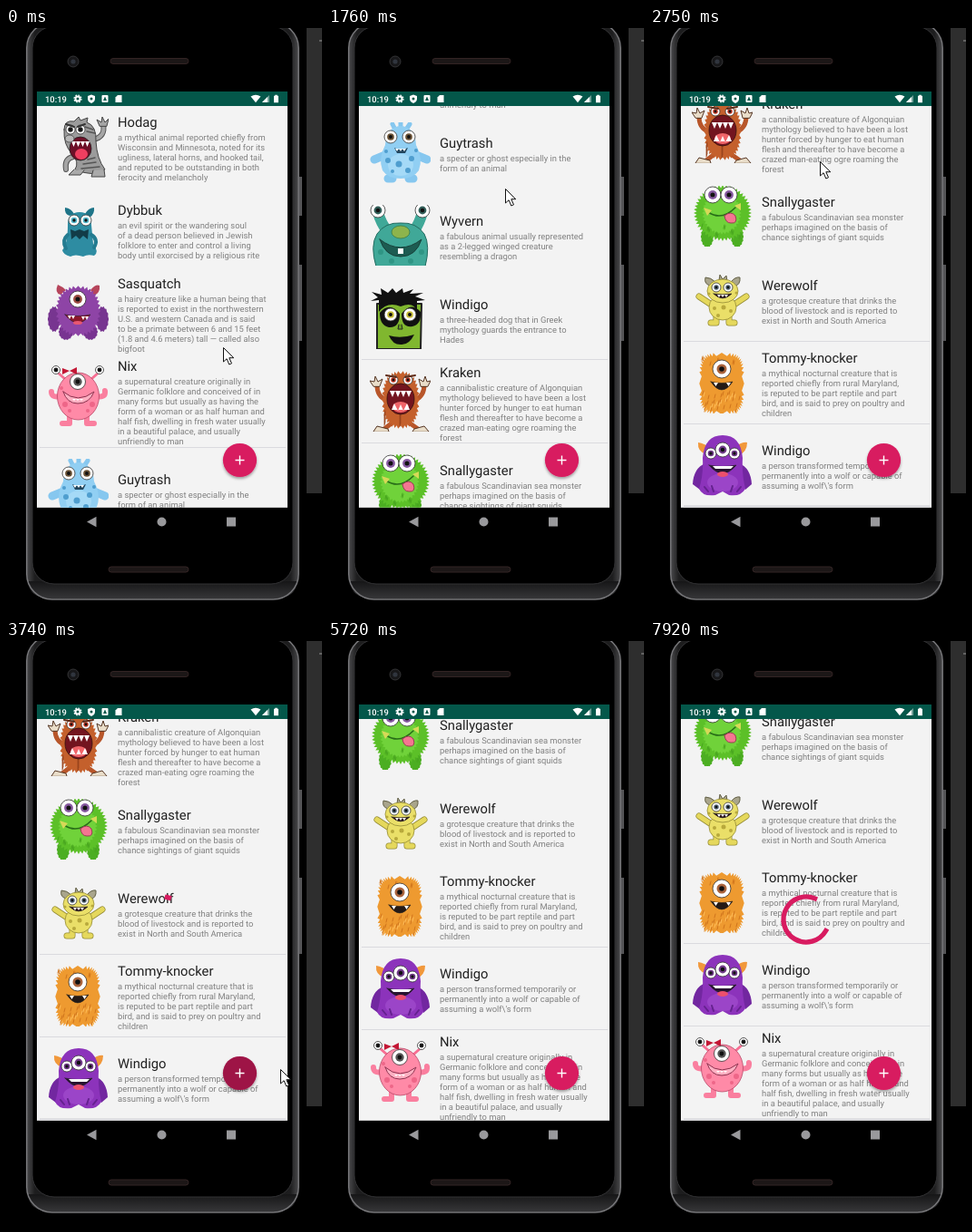
Recreate the animation shown at these times as an HTML page. Size 348 px wide and 645 px high, loop 8 s.

```html
<!DOCTYPE html>
<html lang="en">
<head>
<meta charset="utf-8">
<title>Monster list</title>
<style>
html, body { margin: 0; width: 100%; height: 100%; overflow: hidden; background: #000; }
svg { display: block; width: 348px; height: 645px; }
text { font-family: Roboto, sans-serif; text-rendering: geometricPrecision; }
.title { font-size: 14.77px; fill: #202020; }
.body { font-size: 9.4px; fill: #808080; }
.time { font-size: 9.4px; font-weight: 500; fill: #fff; }
</style>
</head>
<body>
<svg viewBox="0 0 348 645">
  <defs>
    <clipPath id="listClip"><rect x="34" y="86" width="276" height="442.8"/></clipPath>
    <clipPath id="box"><rect width="67" height="67"/></clipPath>
    <filter id="shade" x="-40%" y="-40%" width="180%" height="190%">
      <feDropShadow dx="0" dy="2" stdDeviation="1.6" flood-opacity=".35"/>
    </filter>
    <linearGradient id="rim">
      <stop stop-color="#4a4a4c"/><stop offset=".03" stop-color="#1d1d1e"/>
      <stop offset=".97" stop-color="#1d1d1e"/><stop offset="1" stop-color="#4a4a4c"/>
    </linearGradient>
    <linearGradient id="chin" x2="0" y2="1">
      <stop stop-color="#161617"/><stop offset="1" stop-color="#363638"/>
    </linearGradient>
  </defs>

  <rect width="348" height="645"/>
  <rect x="331" width="17" height="513" fill="#2e2e2e"/>
  <path d="M345 14h3" stroke="#999"/>
  <path d="M324.5 164v43M324.5 261v84" stroke="#555557" stroke-width="3"/>
  <rect x="22.8" y="-6" width="299.4" height="636" rx="28" fill="url(#rim)"/>
  <path d="M24 610H321Q319 629 296 629H49Q26 629 24 610z" fill="url(#chin)"/>
  <rect x="22.8" y="-6" width="299.4" height="636" rx="28" fill="none" stroke="#77777a" stroke-width="1.5"/>
  <rect x="29" y="-2" width="287" height="615" rx="24" stroke="#343436"/>
  <g fill="#1c1717" stroke="#332424">
    <rect x="115" y="33.5" width="86" height="6" rx="3"/>
    <rect x="113" y="594" width="88" height="6" rx="3"/>
  </g>
  <circle cx="74" cy="37" r="6" fill="#171719" stroke="#343436"/>
  <circle cx="74" cy="37" r="2.6" fill="#30353e"/>

  <rect x="34" y="70" width="276" height="458.8" fill="#f3f3f3"/>
  <g clip-path="url(#listClip)"><g id="list"></g><g id="lines"></g></g>
  <circle id="spin" cx="172" cy="307" r="25" fill="none" stroke="#d81b60" stroke-width="5.3"
    stroke-linecap="square" pathLength="360"/>
  <g filter="url(#shade)"><circle cx="257.5" cy="476.5" r="18.6" fill="#d81b60"/></g>
  <circle id="press" cx="257.5" cy="476.5" r="18.6"/>
  <path d="M252.5 476.5h10M257.5 471.5v10" stroke="#fff" stroke-width="1.4"/>

  <rect x="34" y="70" width="276" height="16" fill="#04574a"/>
  <text class="time" x="43" y="81.5">10:19</text>
  <g fill="#fff">
    <circle cx="79" cy="78" r="2.5" fill="none" stroke="#fff" stroke-width="2"/>
    <circle cx="79" cy="78" r="4" fill="none" stroke="#fff" stroke-width="1.2" stroke-dasharray="1.7 1.44"/>
    <path d="M94 73.4l4 1.6v3q0 3.4-4 5q-4-1.6-4-5v-3z"/>
    <circle cx="94" cy="78" r="1.5" fill="#04574a"/>
    <rect x="105.5" y="74" width="7" height="8" rx="1"/>
    <path d="M109 75.5l-2 4.5h4z" fill="#04574a"/>
    <path d="M123 74h4.5v8h-7v-5.5z"/>
    <path d="M269.5 75.5q5.5-3.6 11 0l-5.5 6.700z"/>
    <path d="M290 74v8h-8z" opacity=".45"/><path d="M288 76v6h-6z"/>
    <path d="M295 74.8h1.3v-1h2.4v1h1.3v7.4h-5z"/>
  </g>
  <g fill="#99999c">
    <path d="M89 544.5l10.5-5.8v11.6z"/>
    <circle cx="171.5" cy="544.5" r="5"/>
    <rect x="243" y="539.5" width="10" height="10"/>
  </g>
  <path id="cursor" d="M.5.5v15.500l3.600-3.300 2.700 6.300 2.700-1.200-2.700-6.100h5z" fill="#fff" stroke="#111"/>
</svg>

<script>
const $ = id => document.getElementById(id);

// Drawing helpers; each returns SVG markup in a 67 x 67 box.
const path = (d, fill, line = 'none', w = 1) =>
  `<path d="${d}" fill="${fill}" stroke="${line}" stroke-width="${w}" stroke-linejoin="round" stroke-linecap="round"/>`;
const oval = (x, y, rx, ry, fill, line = 'none') =>
  `<ellipse cx="${x}" cy="${y}" rx="${rx}" ry="${ry}" fill="${fill}" stroke="${line}" stroke-width=".8"/>`;
const eye = (x, y, r, iris = '#222') => oval(x, y, r, r, '#fff', '#333')
  + oval(x, y, r * .55, r * .55, iris) + oval(x, y, r * .28, r * .28, '#111');
const eyes = (xs, y, r, iris) => xs.map(x => eye(x, y, r, iris)).join('');
const spots = (color, ...pts) => pts.map(([x, y, r]) => oval(x, y, r, r, color)).join('');
const grin = (x, y, w, h, fill = '#2a1018') =>
  path(`M${x - w} ${y}Q${x} ${y + h / 3} ${x + w} ${y}Q${x} ${y + h * 2} ${x - w} ${y}z`, fill, '#222', .6);
const teeth = (x, y, w, n, h = 4) => path(`M${x} ${y}` + `l${w / 2} ${h}l${w / 2} ${-h}`.repeat(n) + 'z', '#fff');
function fur(x, y, rx, ry, fill, n = 34, power = 1) {
  let d = '';
  for (let i = 0; i < n * 2; i++) {
    const a = i * Math.PI / n, k = i % 2 ? .92 : 1.03;
    const bend = v => Math.sign(v) * Math.abs(v) ** power;
    d += `${i ? 'L' : 'M'}${(x + rx * k * bend(Math.cos(a))).toFixed(1)} ${(y + ry * k * bend(Math.sin(a))).toFixed(1)}`;
  }
  return path(d + 'z', fill);
}
// Scattered short hairs inside a rectangle.
const hairs = (x, y, w, h, n, color) => path(Array.from({ length: n }, (_, i) =>
  `M${x + i * 17 % w} ${y + i * 11 % h}l-1 4`).join(''), 'none', color);

const art = {
  hodag: path('M28 44Q18 46 20 58M50 25Q64 22 61 8', 'none', '#555', 6)
    + path('M28 44Q18 46 20 58M50 25Q64 22 61 8', 'none', '#a5a5a5', 4)
    + path('M57 10l-3-7 5 3 1-6 3 6 4-4-2 8z', '#a5a5a5', '#444')
    + path('M18 14Q18 3 29 5L34 0l2 4 8-3-1 5Q54 10 53 27Q54 46 63 58Q50 67 30 58Q35 50 27 41Q17 31 18 14z', '#9b9b9b', '#444')
    + path('M41 11l9 3M43 16l9 2M39 52l14-2M37 57l20-2M44 47l8-2', 'none', '#555', 1.5)
    + path('M29 58l-6 6h13l4-5M50 59l-2 7h15l-1-8', '#aaa', '#444')
    + eyes([25, 36], 14, 5) + path('M20 8l9 3M33 11l8-3', 'none', '#333', 2)
    + oval(36, 35, 12, 13, '#6d1028', '#222') + oval(37, 41, 7, 6, '#ef3f60') + teeth(26, 27, 5, 4, 6) + oval(24, 24, 5, 4, '#b8b8b8', '#444'),
  dybbuk: path('M24 18Q18 16 19 9Q26 10 29 16M41 16Q45 9 51 9Q52 16 46 20', '#1e7488')
    + path('M22 28Q22 14 35 14Q48 14 48 28L50 49Q57 58 51 62Q44 60 39 63Q30 60 25 63Q17 61 16 56Q22 49 22 28z', '#2e8ca2')
    + path('M22 39Q15 45 20 54M48 39Q56 44 51 53', 'none', '#237b90', 4)
    + eyes([29, 42], 23, 6, '#54b8cc') + path('M25 33l5 2 5-2 5 2 5-2-1 11-5-4-4 4-4-4-5 4z', '#123c48'),
  sasquatch: path('M14 13Q7 11 11 2Q16 4 20 8M47 8Q53 1 57 3Q58 11 51 14', '#b6455b')
    + fur(7, 40, 7, 14, '#773590', 14) + fur(60, 40, 7, 14, '#773590', 14)
    + fur(20, 54, 8, 9, '#783391', 14) + fur(47, 54, 8, 9, '#783391', 14)
    + fur(33.5, 31, 24, 27, '#8e44a6', 36, .85) + eye(33, 18, 9, '#9c4d42')
    + grin(33, 35, 14, 9, '#8d172c') + teeth(22, 36, 4, 2) + teeth(37, 37, 4, 2) + oval(33, 44, 5, 2, '#e85771'),
  nix: path('M19 15L10 7M48 15L57 7', 'none', '#f76f93', 3) + eyes([9, 57], 5, 4.5)
    + path('M13 34Q4 36 4 29M54 34Q64 36 63 28M24 55v9h-8M43 55v9h8', 'none', '#fa7f9f', 6)
    + oval(33.5, 34, 23, 26, '#ff8aa7', '#b84867') + path('M24 6l-8-3v7zl8-4v8z', '#c31735')
    + eye(33, 18, 8.5, '#555') + path('M17 29Q33 43 51 29Q46 42 33 42Q21 42 17 29z', '#ffb0c2', '#8d3350')
    + spots('#ee6688', [19, 43, 3], [49, 43, 3], [24, 50, 2], [44, 50, 2], [15, 25, 2]) + teeth(27, 37, 4, 3, 2),
  guytrash: path('M28 8L25 2M34 6V0M40 8L44 2', 'none', '#86c7ef', 5)
    + path('M17 36L5 41M51 36L63 41M25 57v5h-5M43 57v5h5', 'none', '#86c7ef', 9)
    + path('M34 4Q50 5 51 25Q59 40 54 53Q48 62 34 62Q20 62 14 53Q9 40 17 25Q18 5 34 4z', '#91cff3')
    + oval(34, 47, 14, 12, '#a5daf7')
    + eyes([23, 43], 16, 7, '#6a5235') + path('M27 28Q34 32 42 28L39 34H30z', '#22465d') + teeth(28, 29, 4, 3, 3)
    + spots('#4f9ecf', [20, 42, 3], [32, 46, 3.5], [46, 40, 3], [42, 53, 3], [25, 54, 2], [18, 32, 2], [51, 31, 2]),
  wyvern: path('M9 8Q12 20 20 30M58 8Q55 20 48 30', 'none', '#40a898', 12)
    + path('M7 68Q0 45 8 32Q17 19 34 20Q51 19 60 32Q67 45 61 68z', '#40a898', '#246b60')
    + eyes([9, 58], 6, 8, '#315c57') + oval(34, 30, 10, 7, '#8db44c', '#3d7c45')
    + path('M11 38Q34 56 57 38Q51 57 34 57Q17 57 11 38z', '#1d5c52', '#173f39') + path('M31 48h6v6h-6z', '#fff')
    + spots('#2f9584', [12, 52, 3], [57, 52, 3], [24, 62, 3], [45, 62, 3]),
  windigo: path('M8 17H57L56 67H8z', '#80b72f', '#222', 2)
    + path('M10 26V13L1 14l8-4L2 4l11 3L12 0l8 5 5-5 4 5 7-5 1 5 11-4-4 5 15-1-9 4 11 4-9 1V26Q49 14 34 20Q19 14 10 26z', '#111')
    + path('M11 27Q22 14 33 28Q33 44 21 43Q11 41 11 27zM35 28Q45 14 56 26Q57 40 47 42Q35 44 35 28z', '#111')
    + eyes([23, 44], 29, 7, '#c8bd3a') + path('M32 40l-1 5h5l-1-5', '#679b22', '#222')
    + path('M21 52Q34 56 49 51Q43 63 34 62Q25 62 21 52z', '#111'),
  kraken: path('M18 32Q8 28 8 16M50 32Q60 28 60 15M25 57l-9 7M43 57l10 7', 'none', '#b8562a', 5)
    + path('M4 17l-4-6 5 1 1-6 3 6 5-3-3 8zM56 17l-2-8 5 3 2-6 2 6 4-1-3 6zM4 67l4-6 12 3 1 3zM47 67l2-3 11-3 5 6z', '#e9ddc9', '#543523')
    + fur(34, 32, 20, 31, '#c4602c', 38, .8) + hairs(17, 44, 34, 14, 14, '#98431c')
    + eyes([26, 42], 10, 5, '#c03824') + path('M18 5l11 2M39 7l11-2', 'none', '#5d2a16', 2)
    + oval(34, 31, 15, 17, '#73151f', '#31140f') + oval(34, 40, 9, 6, '#f06569') + teeth(22, 22, 6, 4, 7)
    + path('M24 43l3-7 4 8 3-7 3 7 4-8 3 7', '#fff'),
  snallygaster: fur(17, 56, 7, 12, '#4cae22', 16) + fur(50, 56, 7, 12, '#4cae22', 16)
    + fur(34, 30, 31, 30, '#5cc028', 48) + fur(33, 30, 21, 23, '#70d23a', 36)
    + eyes([23, 41], 10, 9, '#875aa1')
    + path('M18 29Q33 39 48 24', 'none', '#286d18', 1.6)
    + path('M36 33Q43 27 48 33Q51 42 43 41Q37 41 36 33z', '#f47691', '#9a3d53')
    + path('M13 24l9 3-5 6zM47 22l7-3v8z', '#d6d957') + hairs(12, 42, 43, 14, 14, '#48a51f'),
  werewolf: path('M21 19Q13 18 15 10Q21 10 26 15M43 15Q48 9 53 10Q54 18 47 20M30 13l1-6 3 5 4-4 1 6', '#a9a58c', '#625f46')
    + path('M20 39L8 31M48 39L60 31M27 52v8h-6M41 52v8h6', 'none', '#948b35', 7)
    + path('M20 39L8 31M48 39L60 31M27 52v8h-6M41 52v8h6', 'none', '#e5d85c', 5.5)
    + oval(34, 43, 15, 14, '#eadf68', '#948b35') + oval(34, 25, 17, 13, '#eadf68', '#948b35')
    + eyes([27, 40], 21, 5, '#526777') + grin(34, 28, 10, 5) + teeth(28, 29, 4, 3, 3)
    + spots('#b8a93b', [25, 44, 2], [35, 43, 2.5], [43, 47, 2], [29, 52, 2], [19, 28, 1.5], [49, 27, 1.5]),
  tommy: fur(33, 34, 24, 33, '#ee9a30', 44, .5) + hairs(13, 42, 41, 21, 24, '#d0741c') + hairs(12, 4, 42, 9, 8, '#d0741c')
    + hairs(14, 44, 39, 20, 14, '#ffbd58')
    + eye(33, 18, 10, '#a9633c') + grin(33, 32, 12, 9, '#241a16') + teeth(24, 33, 5, 1) + teeth(38, 33, 5, 1),
  purple: path('M16 21Q6 18 7 8Q14 9 22 15M47 13Q56 7 61 8Q61 18 52 22', '#f1983b')
    + path('M15 31Q2 36 1 54L9 60L17 46M52 31Q65 36 66 54L59 60L51 46', '#7227a0')
    + path('M12 25Q14 0 34 0Q54 0 56 25Q55 43 59 59Q54 68 41 66L34 62L26 66Q12 68 8 59Q13 44 12 25z', '#8c33bb')
    + oval(34, 52, 17, 10, '#9b45c8') + eyes([21, 47], 20, 6, '#703a88') + eye(34, 16, 8, '#703a88')
    + grin(34, 33, 15, 9, '#281331') + path('M23 34h23l-3 3H26z', '#fff') + oval(34, 43, 6, 3, '#ec506d')
    + path('M14 57l4 5M22 56l2 6M45 56l-2 6M54 57l-4 5', 'none', '#65218f', 2)
};

const nixText = 'a supernatural creature originally in|Germanic folklore and conceived of in|many forms but usually as having the|form of a woman or as half human and|half fish, dwelling in fresh water usually|in a beautiful palace, and usually|unfriendly to man';
// name, row top, title centre, picture, description
const rows = [
  ['Hodag', 85, 104, 'hodag', 'a mythical animal reported chiefly from|Wisconsin and Minnesota, noted for its|ugliness, lateral horns, and hooked tail,|and reputed to be outstanding in both|ferocity and melancholy'],
  ['Dybbuk', 176, 201, 'dybbuk', 'an evil spirit or the wandering soul|of a dead person believed in Jewish|folklore to enter and control a living|body until exorcised by a religious rite'],
  ['Sasquatch', 268, 282, 'sasquatch', 'a hairy creature like a human being that|is reported to exist in the northwestern|U.S. and western Canada and is said|to be a primate between 6 and 15 feet|(1.8 and 4.6 meters) tall — called also|bigfoot'],
  ['Nix', 359, 373, 'nix', nixText],
  ['Guytrash', 462, 498, 'guytrash', 'a specter or ghost especially in the|form of an animal'],
  ['Wyvern', 553, 584, 'wyvern', 'a fabulous animal usually represented|as a 2-legged winged creature|resembling a dragon'],
  ['Windigo', 645, 676, 'windigo', 'a three-headed dog that in Greek|mythology guards the entrance to|Hades'],
  ['Kraken', 736, 751, 'kraken', 'a cannibalistic creature of Algonquian|mythology believed to have been a lost|hunter forced by hunger to eat human|flesh and thereafter to have become a|crazed man-eating ogre roaming the|forest'],
  ['Snallygaster', 828, 859, 'snallygaster', 'a fabulous Scandinavian sea monster|perhaps imagined on the basis of|chance sightings of giant squids'],
  ['Werewolf', 919, 951, 'werewolf', 'a grotesque creature that drinks the|blood of livestock and is reported to|exist in North and South America'],
  ['Tommy-knocker', 1012, 1031, 'tommy', 'a mythical nocturnal creature that is|reported chiefly from rural Maryland,|is reputed to be part reptile and part|bird, and is said to prey on poultry and|children'],
  ['Windigo', 1103, 1133, 'purple', "a person transformed temporarily or|permanently into a wolf or capable of|assuming a wolf\\'s form"],
  ['Nix', 1194, 1208, 'nix', nixText]
];
$('list').innerHTML = rows.map(([name, top, y, pic, about]) =>
  `<g><g transform="translate(46 ${top + 13})" clip-path="url(#box)">${art[pic]}</g>
  <text class="title" x="123" y="${y + 5}">${name}</text>${about.split('|').map((line, i) =>
    `<text class="body" x="123" y="${y + 20 + i * 11}">${line}</text>`).join('')}</g>`).join('');
const added = $('list').lastElementChild;
const dividers = [462, 736, 828, 1012, 1103, 1194, 1297];

const easeOut = u => 1 - (1 - u) ** 3;
const easeBoth = u => u * u * (3 - 2 * u);
function track(keys, t, ease, col = 1) {
  const i = keys.findIndex(k => k[0] > t);
  if (i < 0) return keys[keys.length - 1][col];
  if (!i) return keys[0][col];
  const a = keys[i - 1], b = keys[i];
  return a[col] + (b[col] - a[col]) * ease((t - a[0]) / (b[0] - a[0]));
}
// Two drags, each followed by a fling; then the list glides to the added row.
const scrollKeys = [[220, 0], [1540, 371], [2090, 371], [2640, 667], [5500, 667], [5830, 770]];
const pointerKeys = [[110, 239, 352], [660, 195, 177], [1760, 195, 177], [2090, 195, 320], [2530, 187, 147],
  [2750, 187, 147], [3300, 258, 476], [3520, 258, 476], [3740, 302, 472],
  [6820, 300, 460], [7040, 258, 474], [7260, 258, 474], [7480, 302, 470]];
const pressKeys = [[3520, 0], [3630, 1], [3850, 1], [4180, 0], [7260, 0], [7370, 1], [7480, 1], [7810, 0]];

// Cubic timing curve through (0,0) and (x3,1), solved for x.
function curve(x, x1, x2, x3) {
  let lo = 0, hi = 1, s;
  for (let i = 0; i < 24; i++) {
    s = (lo + hi) / 2;
    const m = 1 - s;
    if (3 * m * m * s * x1 + 3 * m * s * s * x2 + s ** 3 * x3 < x) lo = s; else hi = s;
  }
  return 3 * (1 - s) * s * s + s ** 3;
}
function spinner(age) {
  const u = age % 1333 / 1333;
  const head = u < .5 ? curve(u, .2, .1, .5) : 1;
  const tail = u > .5 ? curve(u - .5, .2, .1, .5) : 0;
  const turn = tail * 270 + u * 90 + age * 720 / 4444 - 90;
  $('spin').setAttribute('stroke-dasharray', `${Math.max(.1, (head - tail) * 270)} 720`);
  $('spin').setAttribute('transform', `rotate(${turn} 172 307)`);
}
const show = (node, on) => node.setAttribute('visibility', on ? 'visible' : 'hidden');

function draw(now) {
  const t = Math.floor(now % 8000 / 110) * 110;
  const scroll = Math.round(track(scrollKeys, t, easeOut));
  $('list').setAttribute('transform', `translate(0 ${-scroll})`);
  const end = t < 5500 ? 1194 : 1297;
  show(added, t >= 5500);
  $('lines').innerHTML = dividers.filter(y => y <= end && y - scroll > 320).map(y =>
    `<path d="M37 ${y - scroll + .5}h271" stroke="#dadade" stroke-width="${y === end ? 2.5 : 1}"/>`).join('');

  const first = t >= 3740 && t < 5500, second = t >= 7480;
  show($('spin'), first || second);
  if (first || second) spinner(t - (first ? 3685 : 7397));

  $('press').setAttribute('fill-opacity', .27 * track(pressKeys, t, u => u));
  show($('cursor'), t <= 3740 || t >= 6820 && t <= 7480);
  $('cursor').setAttribute('transform',
    `translate(${track(pointerKeys, t, easeBoth)} ${track(pointerKeys, t, easeBoth, 2)})`);
}

const start = performance.now();
function loop() {
  draw(performance.now() - start);
  requestAnimationFrame(loop);
}
loop();
</script>
</body>
</html>
```
